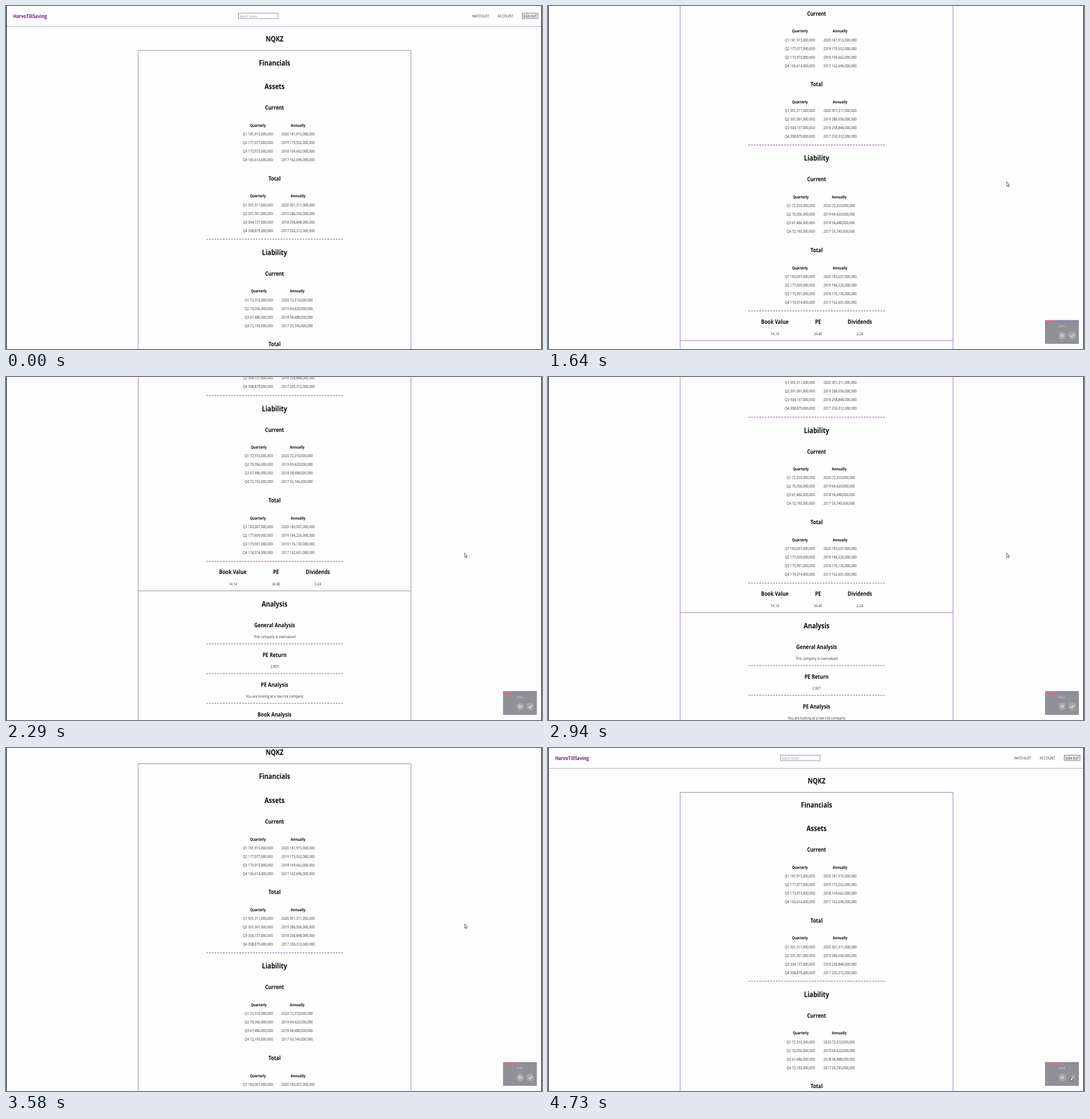
Recreate the animation shown at these times as an HTML page. Size 935 by 599 pixels, loop 4.78 s.

```html
<!DOCTYPE html>
<html lang="en">
<head>
<meta charset="utf-8">
<title>Stock report</title>
<style>
html, body { margin: 0; width: 100%; height: 100%; overflow: hidden; background: #fdfdfd; }
svg { display: block; width: 100vw; height: 100vh; }
text { font-family: "Open Sans", "Noto Sans", sans-serif; text-rendering: geometricPrecision; }
.crisp { shape-rendering: crispEdges; }
</style>
</head>
<body>
<svg viewBox="0 0 935 599">
  <g id="page"></g>
  <path d="M.6 0V599M934.4 0V599" stroke="#24222c" stroke-width="1.2"/>
  <g id="recorder">
    <rect x="867" y="548.5" width="59" height="41.5" fill="#909096"/>
    <rect x="868" y="549" width="58" height="2.4" fill="#8484ae"/>
    <rect id="bar" x="868" y="549" height="2.4" fill="#ea6577"/>
    <path d="M880 573.5L878.3 575.3 880 577" fill="none" stroke="#77777f" stroke-width=".8"/>
    <circle cx="897" cy="575.3" r="7" fill="#a5a5a9"/>
    <circle id="done" cx="914.5" cy="575.3" r="7"/>
    <path d="M895.6 572.5V578M898.4 572.5V578M911.5 575.5L913.7 577.8 917.7 573" fill="none" stroke="#f4f4f4" stroke-width="1.2"/>
  </g>
  <path id="cursor" d="M0 0V7.6L1.7 6.1 2.8 8.7 4 8.2 2.9 5.7H5Z" fill="#fff" stroke="#333" stroke-width=".75"/>
</svg>
<script>
const LOOP = 4780;
const SQUEEZE = 0.825; // the whole screen is narrowed by this factor
const NS = "http://www.w3.org/2000/svg";
const MID = 468.5;
const INK = "#0c0c0c", SOFT = "#383838", PURPLE = "#b57fcb";
const $ = id => document.getElementById(id);
const page = $("page");

function add(parent, tag, attrs) {
  const el = document.createElementNS(NS, tag);
  for (const k in attrs) el.setAttribute(k, attrs[k]);
  return parent.appendChild(el);
}

function write(str, x, y, size, opt = {}) {
  const el = add(opt.parent || page, "text", {
    x: x / SQUEEZE, y: y + size * 0.36, "font-size": size,
    transform: `scale(${SQUEEZE} 1)`, fill: opt.fill || INK,
    "font-weight": opt.bold ? 700 : 400, "text-anchor": opt.anchor || "middle"
  });
  el.textContent = str;
  return el;
}

const big = (s, y) => write(s, MID, y, 13.2, { bold: true });
const mid = (s, y, x = MID) => write(s, x, y, 10.4, { bold: true });
const small = (s, x, y) => write(s, x, y, 6.95, { fill: SOFT });
const line = (d, stroke, more) =>
  add(page, "path", { d, stroke, fill: "none", "stroke-width": 1, class: "crisp", ...more });
const dashes = y =>
  line(`M349.5 ${y}H588`, "#9b3fae", { "stroke-dasharray": "3 1.8", class: "" });
const field = (x, width, fill, stroke) =>
  add(page, "rect", { x, y: 12.5, width, height: 9.5, fill, stroke, "stroke-width": 0.9 });

// One column per period; amounts are written in millions.
function column(name, labels, amounts, x, y) {
  write(name, x, y + 31, 6.9, { bold: true });
  amounts.split(" ").forEach((n, i) =>
    small(`${labels(i)} ${n},000,000`, x, y + 46 + 15 * i));
}

function table(title, y, quarters, years, inset = 0) {
  mid(title, y);
  column("Quarterly", i => "Q" + (i + 1), quarters, 439.5 + inset, y);
  column("Annually", i => 2020 - i, years, 509.5 - inset, y);
}

function buildNav() {
  write("HarvoTillSaving", 12.5, 17.5, 9.2, { bold: true, fill: "#7d1a86", anchor: "start" });
  field(405.5, 69, "#fff", "#9284a8");
  write("Search stocks", 407.5, 17.5, 5.8, { fill: "#8c8c98", anchor: "start" });
  write("WATCHLIST", 828, 17.3, 6.8, { fill: SOFT });
  write("ACCOUNT", 871.3, 17.3, 7, { fill: SOFT });
  field(900.5, 27.5, "#efefef", "#777");
  write("SIGN OUT", 914.2, 17.3, 6.3, { fill: "#222" });
  line("M1 35.3H934", "#b9aac9");
}

function buildReport() {
  big("NQKZ", 57);
  line("M230.7 77H706.3V997H230.7ZM230.7 748.8H706.3", PURPLE);
  big("Financials", 99);

  big("Assets", 140.5);
  table("Current", 177.5, "181,915 177,077 173,973 165,614", "181,915 175,552 169,662 162,696");
  table("Total", 301, "301,311 301,001 304,137 308,879", "301,311 286,556 258,848 250,312");
  dashes(407.2);

  big("Liability", 430);
  table("Current", 467, "72,310 70,056 67,486 72,193", "72,310 69,420 58,488 55,745", 1.5);
  table("Total", 590.7, "183,007 177,609 173,901 174,374", "183,007 184,226 176,130 162,601");
  dashes(697);

  const ratio = (name, value, x) => { mid(name, 715.5, x); small(value, x, 736.8); };
  ratio("Book Value", "14.14", 395.7);
  ratio("PE", "34.40", 471);
  ratio("Dividends", "2.24", 544);

  big("Analysis", 771);
  const notes = {
    "General Analysis": "This company is overvalued",
    "PE Return": "2.907",
    "PE Analysis": "You are looking at a low risk company",
    "Book Analysis": "This company is overvalued"
  };
  Object.entries(notes).forEach(([title, text], i) => {
    const y = 808 + 52 * i;
    if (i) dashes(y - 19);
    mid(title, y);
    small(text, MID, y + 21);
  });
}

buildNav();
buildReport();
const clock = write("00:00", 896.5, 559.5, 5.2, { parent: $("recorder"), fill: "#e2e2e6" });

// Progress from 0 to 1 between two times.
const glide = (t, from, to) => Math.min(1, Math.max(0, (t - from) / (to - from)));

const scrollAt = t => 164.5 * glide(t, 885, 1640)
  + 235.5 * glide(t, 1640, 2367) - 400 * glide(t, 2800, 3690);

function cursorAt(t) {
  const enter = glide(t, 50, 800), drift = glide(t, 1050, 1400);
  const leave = glide(t, 3780, 4080), press = glide(t, 4080, 4450);
  return [
    880 - 87 * enter + 7 * drift + 82.5 * leave + 29 * press,
    560 - 253 * enter + 198.5 * leave + 69 * press
  ];
}

function tick(t) {
  const lag = t < 1140 ? 0 : t < 3330 ? 10 : 20;
  return Math.floor((t + lag) / 50) * 50 - lag;
}

function draw(ms) {
  const t = tick(ms % LOOP);
  const [x, y] = cursorAt(t);
  const shown = t < 50 ? "hidden" : "visible";
  page.setAttribute("transform", `translate(0 ${-scrollAt(t)})`);
  $("cursor").setAttribute("transform", `translate(${x} ${y})`);
  $("cursor").setAttribute("visibility", shown);
  $("recorder").setAttribute("visibility", shown);
  $("bar").setAttribute("width", t * 0.008);
  $("done").setAttribute("fill", x > 907 && y > 567 ? "#94949a" : "#a5a5a9");
  clock.textContent = "00:0" + Math.floor(t / 1000);
}

let start = null;
function loop(now) {
  if (start === null) start = now;
  draw(now - start);
  requestAnimationFrame(loop);
}
draw(0);
requestAnimationFrame(loop);
</script>
</body>
</html>
```
